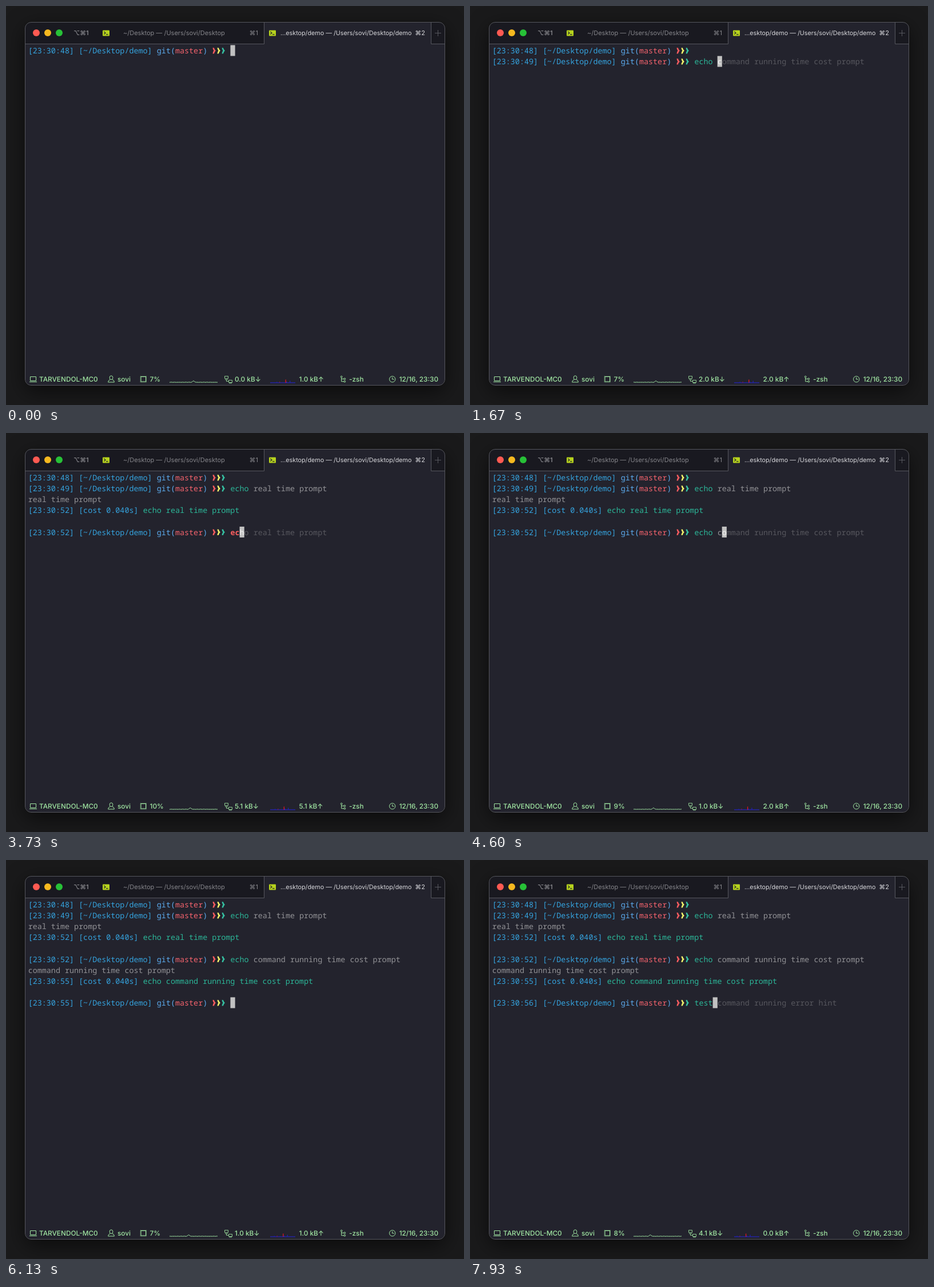
An HTML page that plays this animation: 801x699 px, repeating every 8 s.

```html
<!DOCTYPE html>
<html lang="en">
<head>
<meta charset="utf-8">
<title>Terminal prompt</title>
<style>
  html, body { margin: 0; width: 100%; height: 100%; overflow: hidden; background: #1a1a1b; }
  #window {
    position: absolute; left: 34px; top: 29px; width: 733px; height: 635px;
    border-radius: 10px; background: #23232d;
    box-shadow: 0 10px 36px rgba(0, 0, 0, .6), 0 0 2px #000;
  }
  svg { position: absolute; left: 0; top: 0; display: block; }
  text { white-space: pre; text-rendering: geometricPrecision; }
  #screen { font: 13.4px "Noto Sans Mono", "DejaVu Sans Mono", monospace; }
  #tabs { font: 11px Inter, "Open Sans", sans-serif; fill: #85858a; }
  #status { font: 500 11.8px Inter, "Open Sans", sans-serif; fill: #a0e6a2; }
  .line { fill: none; stroke: #a0e6a2; stroke-width: 1; }
  .edge { fill: none; stroke: #56575e; stroke-width: 1; }
</style>
</head>
<body>
<div id="window"></div>
<svg width="801" height="699" viewBox="0 0 801 699">
  <defs>
    <g id="shell">
      <rect width="12" height="10" rx="1" fill="#b6d21d"/>
      <path d="M2.3 2.4 L5 4.7 L2.3 7 M6 7.4 H9.6" fill="none" stroke="#23232d" stroke-width="1.2"/>
    </g>
  </defs>

  <g id="tabs">
    <path d="M34 66 V39 A10 10 0 0 1 44 29 H451 V66 Z" fill="#191920"/>
    <path d="M744 29 H757 A10 10 0 0 1 767 39 V66 H744 Z" fill="#191920"/>
    <path class="edge" d="M34 66.5 H451.5 V28.5 M743.5 28.5 V66.5 H767 M750 47.5 H761 M755.5 42 V53"/>
    <circle cx="53" cy="47" r="6" fill="#ff5a52"/>
    <circle cx="73" cy="47" r="6" fill="#f6b91f"/>
    <circle cx="93" cy="47" r="6" fill="#27c137"/>
    <text x="118" y="50.5" font-weight="600">⌥⌘1</text>
    <use href="#shell" x="169" y="42.5"/>
    <text x="205" y="51">~/Desktop — /Users/sovi/Desktop</text>
    <text x="441" y="51" text-anchor="end">⌘1</text>
    <use href="#shell" x="460" y="42.5"/>
    <g fill="#d8d8dc">
      <text x="480" y="51" font-size="10.75">...esktop/demo — /Users/sovi/Desktop/demo</text>
      <text x="733" y="51" text-anchor="end">⌘2</text>
    </g>
  </g>
  <rect class="edge" x="33.5" y="28.5" width="734" height="636" rx="10.5"/>

  <g id="screen"></g>

  <g id="status">
    <path class="line" d="M42.5 649.5 H52.5 V656.5 H42.5 Z M41 658.5 H54"/>
    <text x="58" y="658">TARVENDOL-MC0</text>
    <g class="line">
      <ellipse cx="184" cy="651.2" rx="2.9" ry="3.4"/>
      <path d="M182.2 654.5 Q178.6 655.5 178.6 659 H189.4 Q189.4 655.5 185.8 654.5"/>
    </g>
    <text x="195" y="658">sovi</text>
    <rect class="line" x="236" y="649.5" width="8.5" height="8.5"/>
    <rect class="line" x="235" y="648.5" width="10.5" height="10.5" stroke-width="1.6" stroke-dasharray="1 1.1" opacity=".8"/>
    <text id="cpu" x="251.5" y="658"></text>
    <path id="load" class="line"/>
    <path class="line" d="M382.5 648.5 H388.5 V652.5 H382.5 Z M389.5 655.5 H395.5 V659.5 H389.5 Z
      M383 654.5 H388 M385.5 655 V657.5 H389 M390 660.8 H395" stroke-width=".8" opacity=".85"/>
    <text id="down" x="400" y="658"></text>
    <path d="M462 660 H506" stroke="#2424dc"/>
    <g id="traffic"></g>
    <text id="up" x="512.5" y="658"></text>
    <g class="line">
      <circle cx="586.7" cy="649.6" r="1.4"/>
      <circle cx="592.3" cy="653.3" r="1.4"/>
      <circle cx="592.3" cy="657.8" r="1.4"/>
      <path d="M586.7 651 V657.8 H591 M586.7 653.3 H591"/>
    </g>
    <text x="600" y="658">-zsh</text>
    <circle class="line" cx="675.7" cy="653.8" r="5.2"/>
    <path class="line" d="M675.7 650.5 V654 H678.8"/>
    <text x="756" y="658" text-anchor="end">12/16, 23:30</text>
  </g>
</svg>

<script>
const LOOP = 8000, COL = 8.04, ROW = 19.11, LEFT = 38.7, TOP = 68.5;
const BLUE = '#35a3de', SKY = '#5cabee', RED = '#f4636d', TEAL = '#2cb698',
      GREY = '#929296', HINT = '#57575e', ALERT = '#ff5f60', CURSOR = '#c1c1c1';
const REAL = 'echo real time prompt', COST = 'echo command running time cost prompt',
      TEST = 'test command running error hint';
const byId = id => document.getElementById(id);

const stamp = s => `[23:30:${s}] `;
const prompt = s => [[BLUE, stamp(s) + '[~/Desktop/demo] '], [SKY, 'git('], [RED, 'master'], [SKY, ')'], 'arrows'];
const cost = (s, cmd) => [[BLUE, stamp(s) + '[cost 0.040s] '], [TEAL, cmd]];

// [ms, row, parts]: a later entry for a row replaces the earlier one
const output = [
  [0, 0, prompt(48)],
  [270, 1, prompt(49)],
  [2930, 2, [[GREY, REAL.slice(5)]]],
  [3000, 3, cost(52, REAL)],
  [3000, 5, prompt(52)],
  [6070, 6, [[GREY, COST.slice(5)]]],
  [6130, 7, cost(55, COST)],
  [6130, 9, prompt(55)],
  [7200, 9, prompt(56)]
];

// [ms, row, typed length, line with its suggested rest]
const keys = [
  [0, 0, 0, ''], [270, 1, 0, ''],
  [600, 1, 1, COST], [930, 1, 2, COST], [1130, 1, 3, COST], [1330, 1, 4, COST], [1600, 1, 5, COST],
  [1870, 1, 6, REAL], [2130, 1, 7, REAL], [2400, 1, 21, REAL],
  [2930, 3, -44, ''], [3000, 5, 0, ''],
  [3400, 5, 1, REAL], [3670, 5, 2, REAL], [3870, 5, 3, REAL], [4070, 5, 4, REAL], [4270, 5, 5, REAL],
  [4530, 5, 6, COST], [4870, 5, 37, COST],
  [6070, 7, -44, ''], [6130, 9, 0, ''],
  [7200, 9, 1, TEST], [7400, 9, 2, TEST], [7600, 9, 3, TEST], [7870, 9, 4, TEST]
];

// [ms, cpu %, kB down, kB up]
const meters = [
  [0, 7, '0.0', '1.0'], [530, 8, '1.0', '1.0'], [1530, 7, '2.0', '2.0'], [2530, 7, '0.0', '0.0'],
  [3530, 10, '5.1', '5.1'], [4530, 9, '1.0', '2.0'], [5530, 7, '1.0', '1.0'],
  [6530, 11, '3.1', '1.0'], [7530, 9, '4.1', '0.0'], [7870, 8, '4.1', '0.0']
];

const latest = (table, t) => table.reduce((found, step, i) => step[0] <= t ? i : found, 0);
const textAt = (row, col, color, text, extra = '') =>
  `<text x="${LEFT + col * COL}" y="${TOP + 14.6 + row * ROW}" fill="${color}" ${extra}>${text}</text>`;

function arrows(row) {
  const y = TOP + 4.7 + row * ROW;
  return ['#ff5c60', '#f3f56b', '#35c0a2'].map((color, i) =>
    `<path fill="${color}" d="M${361.4 + i * COL} ${y} h2.4 q1 3.5 3 5.1 q-2 1.6 -3 5.1 h-2.4 q.6 -3.5 2 -5.1 q-1.4 -1.6 -2 -5.1z"/>`
  ).join('');
}

function drawParts(row, parts) {
  let col = 0;
  return parts.map(part => {
    if (part === 'arrows') return arrows(row);
    const svg = textAt(row, col, ...part);
    col += part[1].length;
    return svg;
  }).join('');
}

function drawInput(row, count, line) {
  if (!line) return '';
  const word = line.slice(0, Math.min(count, 4));
  const style = word.length === 4 ? [TEAL, word] : [ALERT, word, 'font-weight="700"'];
  return textAt(row, 44, ...style)
    + textAt(row, 49, GREY, line.slice(5, Math.max(count, 5)))
    + textAt(row, 45 + count, HINT, line.slice(count + 1));
}

function drawCursor(row, col, under) {
  return `<rect x="${LEFT + col * COL}" y="${TOP + row * ROW}" width="8.2" height="19" fill="${CURSOR}"/>`
    + textAt(row, col, '#f4f4f4', under);
}

function drawScreen(t) {
  const rows = new Map(), inputs = new Map();
  for (const [at, row, parts] of output) if (at <= t) rows.set(row, parts);
  for (const [at, row, count, line] of keys) if (at <= t) inputs.set(row, [count, line]);

  const [, row, count, line] = keys[latest(keys, t)];
  byId('screen').innerHTML = [...rows].map(([r, parts]) => drawParts(r, parts)).join('')
    + [...inputs].map(([r, input]) => drawInput(r, ...input)).join('')
    + drawCursor(row, 44 + count, line.charAt(count));
}

function drawMeters(t) {
  const tick = latest(meters, t), [, cpu, down, up] = meters[tick];
  byId('cpu').textContent = cpu + '%';
  byId('down').textContent = down + ' kB↓';
  byId('up').textContent = up + ' kB↑';

  const points = Array.from({ length: 61 }, (_, i) => {
    const n = i + tick, bump = Math.max(0, 2.6 - Math.abs(n - 30) * 1.1);
    const ripple = .4 * Math.abs(Math.sin(n * 2.3) * Math.sin(n * .7));
    return `${(286 + i * 1.4).toFixed(1)} ${(659.3 - bump - ripple).toFixed(2)}`;
  });
  byId('load').setAttribute('d', 'M' + points.join('L'));

  const bar = (x, h, color) => `<rect x="${x - tick * .74}" y="${660 - h}" width="1.3" height="${h}" fill="${color}"/>`;
  byId('traffic').innerHTML = bar(488.6, 5.5, '#e01820') + bar(490, 2, '#2222cc')
    + bar(478, 2, '#801840') + bar(496, 3.5, '#2222aa') + bar(473, 1.5, '#2222aa');
}

let shown = '';
function frame(now) {
  const t = now % LOOP;
  const state = [output, keys, meters].map(table => latest(table, t)).join();
  if (state !== shown) {
    shown = state;
    drawScreen(t);
    drawMeters(t);
  }
  requestAnimationFrame(() => frame(performance.now() - start));
}
const start = performance.now();
frame(0);
</script>
</body>
</html>
```
